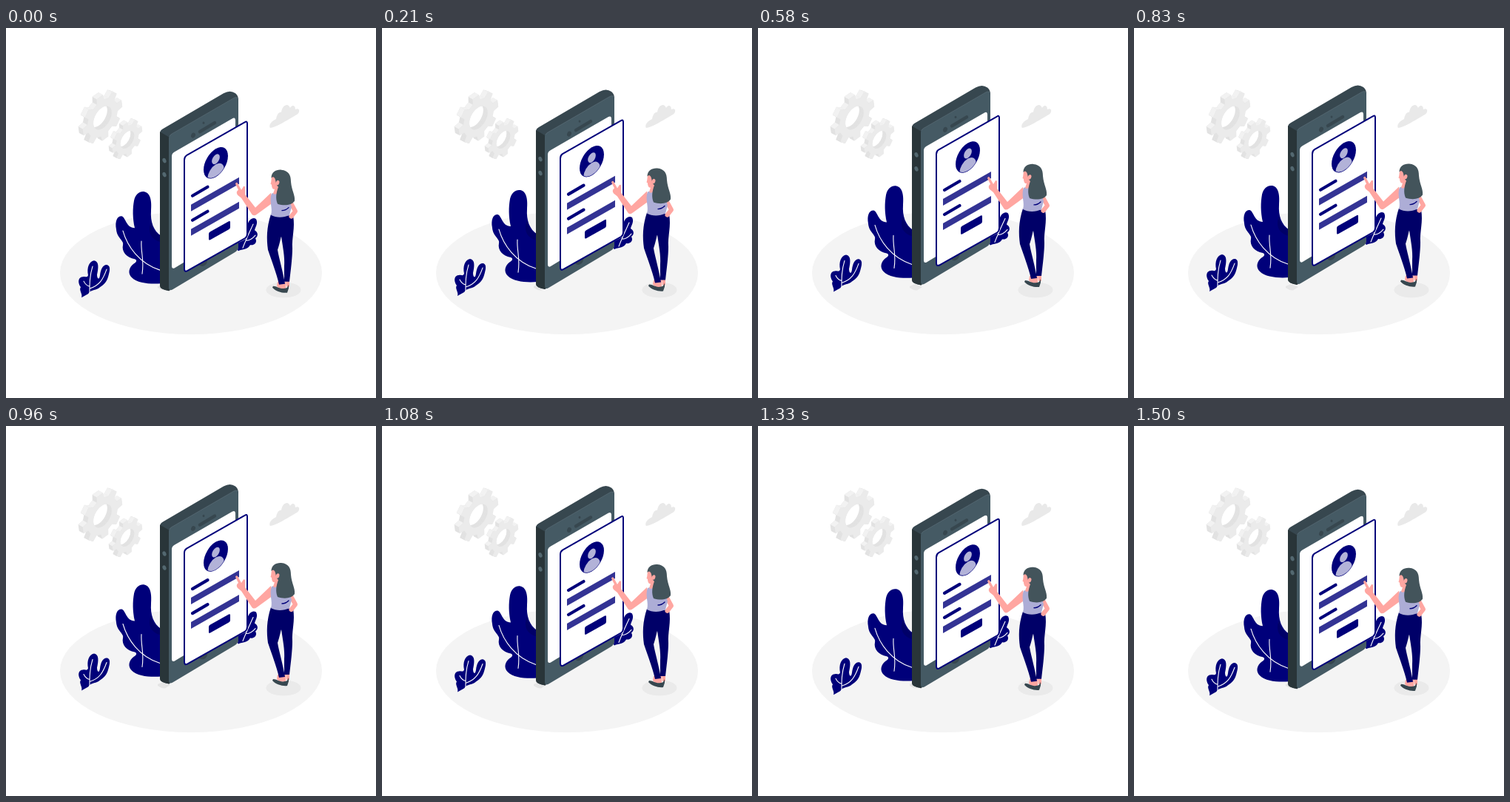
Animation of 500x500 px, one loop 1540 ms. Source, as an HTML page with a canvas:

```html
<!DOCTYPE html>
<html lang="en">
<head>
<meta charset="utf-8">
<title>Mobile sign-in</title>
<style>
html, body { margin: 0; width: 100%; height: 100%; overflow: hidden; background: #fff; }
canvas { display: block; width: 100vw; height: 100vh; }
</style>
</head>
<body>
<canvas id="stage" width="500" height="500"></canvas>
<script>
const ctx = document.getElementById('stage').getContext('2d');
const LOOP = 1540, LIFT = 8.5, PHASE = 45;
const NAVY = '#00007a', DENIM = '#000068', FIELD = '#333394', LILAC = '#b2b2d8', TOP = '#adadd6';
const SLATE = '#455a64', HAIR = '#43545b', EDGE = '#37474f', DARK = '#293539', SKIN = '#ffa6a1';

function fill(path, color) {
  ctx.fillStyle = color;
  ctx.fill(new Path2D(path));
}

function stroke(path, color, width) {
  ctx.strokeStyle = color;
  ctx.lineWidth = width;
  ctx.lineCap = ctx.lineJoin = 'round';
  ctx.stroke(new Path2D(path));
}

function oval(x, y, rx, ry, color, turn = 0) {
  ctx.fillStyle = color;
  ctx.beginPath();
  ctx.ellipse(x, y, rx, ry, turn, 0, Math.PI * 2);
  ctx.fill();
}

function shifted(dy, draw) {
  ctx.save();
  ctx.translate(0, dy);
  draw();
  ctx.restore();
}

// Draws in the plane of the phone's front face.
function onFace(x, y, draw) {
  ctx.save();
  ctx.transform(0.866, -0.5, 0, 1, x, y);
  draw();
  ctx.restore();
}

function gearPoints(radius) {
  const points = [], teeth = 8, step = Math.PI * 2 / teeth;
  const corners = [[-0.31, 0.77], [-0.2, 1], [0.2, 1], [0.31, 0.77]];
  for (let i = 0; i < teeth; i++) {
    for (const [turn, reach] of corners) {
      const angle = (i + turn) * step - 0.14;
      points.push([Math.cos(angle) * radius * reach, Math.sin(angle) * radius * reach]);
    }
  }
  return points;
}

function gear(x, y, radius, depth) {
  const points = gearPoints(radius), hole = radius * 0.46;
  const face = new Path2D();
  points.forEach(p => face.lineTo(...p));
  face.closePath();
  face.moveTo(hole, 0);
  face.arc(0, 0, hole, 0, Math.PI * 2);
  const layer = (d, color) => onFace(x - d, y - d * 0.55, () => {
    ctx.fillStyle = color;
    ctx.fill(face, 'evenodd');
  });
  for (let d = depth; d > 0; d -= 0.5) layer(d, '#e2e2e2');

  // Upward faces catch the light.
  const backX = -depth / 0.866, backY = -depth * 0.55 + backX * 0.5;
  onFace(x, y, () => points.forEach(([ax, ay], i) => {
    const [bx, by] = points[(i + 1) % points.length];
    if (bx - ax <= Math.abs(by - ay) * 0.6) return;
    ctx.fillStyle = '#f2f2f2';
    ctx.beginPath();
    ctx.moveTo(ax, ay);
    ctx.lineTo(bx, by);
    ctx.lineTo(bx + backX, by + backY);
    ctx.lineTo(ax + backX, ay + backY);
    ctx.fill();
  }));
  layer(0, '#ebebeb');
}

function scenery() {
  oval(250, 331, 177, 83, '#f4f4f4');
  oval(375, 354, 23.5, 10.5, '#eaeaea');
  fill('M205 349 L212 346 L222 350 L215 354.5 Q211 355 205 351Z', '#e5e5e5');
  gear(130.5, 121.5, 31, 6);
  gear(164, 151, 23.5, 5);
  fill('M357 135 C354 131 360 125 365 123 C366 117 369 113 372 114 C373 105 381 100 384 108 C387 103 391 105 391 110 C397 107 398 114 393 117 C384 122 366 134 357 135Z', '#e9e9e9');
}

function plants() {
  fill('M210 345 C195 346 178 345 170 337 C164 331 166 323 173 318 C177 316 177 313 174 312 C163 310 156 302 158 293 C160 287 150 284 149 272 C147 261 150 254 156 254 C162 255 162 270 174 270 C171 257 171 244 173 233 C175 224 181 220 187 221 C196 223 197 235 196 247 C195 261 199 274 210 281Z', NAVY);
  fill('M196 262 C198 272 202 277 210 281 L210 289 C198 287 190 277 196 262Z', DENIM);
  stroke('M158 274 C164 295 180 318 208 327 M183 288 C182 304 187 312 184 332', '#fff', 1.1);

  fill('M102 364 C104 359 98 354 101 350 C96 343 98 336 104 336 C108 335 109 338 111 334 C109 324 112 315 119 314 C126 315 125 324 123 333 C123 339 126 341 127 334 C128 326 131 319 137 320 C142 322 140 329 138 336 C136 343 132 347 127 350 C122 355 116 352 111 359Z', NAVY);
  stroke('M117 322 C113 335 113 345 113 358 M136 326 C131 340 126 348 113 352 M105 342 Q108 348 113 349', '#fff', 1.1);

  fill('M313 300 L314 290 L326 284 L326 267 C328 258 334 255 338 258 C341 264 337 268 336 273 C341 276 341 281 337 284 C340 289 336 294 330 293 C326 300 320 298 314 301Z', NAVY);
  stroke('M334 265 C329 276 325 284 320 297 M337 280 Q331 287 325 287', '#fff', 1.1);
}

function phone() {
  fill('M208 142 Q208 138 212 136 L294 88 Q303 83 310 88 Q314 91 314 97 L314 296 L220 355 Q208 353 208 348Z', EDGE);
  fill('M208 140 L220 147 L221 355 Q208 353 208 348Z', DARK);
  fill('M220 149 Q220 145 224 143 L307 95 Q314 91 314 98 L314 295 Q314 300 309 303 L227 352 Q220 357 220 350Z', SLATE);
  stroke('M221 146 Q222 144 224 143 L307 95 Q312 92 313.5 95', '#5b6e77', 0.7);
  fill('M224 173 Q224 169 228 167 L306 122 Q310 120 310 125 L310 274 L228 324 Q224 326 224 321Z', '#fff');
  stroke('M262 140 L282 128', EDGE, 4.4);
  oval(253, 145, 2.8, 3.6, EDGE, 0.4);
  oval(267, 128, 1.4, 1.7, EDGE);
  oval(266, 315, 6, 7, EDGE, 0.5);
  oval(214, 179, 2.4, 3.4, '#536870', -0.4);
  oval(214, 198, 2.4, 3.4, '#536870', -0.4);
}

function avatar() {
  onFace(283.5, 183, () => {
    oval(0, 0, 19, 19, NAVY);
    oval(0, -5, 6.2, 6.2, LILAC);
    ctx.beginPath();
    ctx.arc(0, 0, 18.3, 0, Math.PI * 2);
    ctx.clip();
    oval(0, 15, 13, 13, LILAC);
  });
}

function card() {
  const outline = 'M241 179 Q241 175 244 173 L323 128 Q326 126 326 130 L326 279 Q326 283 323 285 L245 329 Q241 331 241 326Z';
  fill(outline, '#fff');
  stroke(outline, NAVY, 2);
  avatar();
  for (const y of [0, 33]) {
    stroke(`M252 ${227.5 + y} L272.5 ${215.5 + y}`, NAVY, 4.2);
    fill(`M250 ${239.5 + y} L315 ${202.5 + y} V${211.5 + y} L250 ${248.5 + y}Z`, FIELD);
  }
  fill('M274 279 Q274 277 276 276 L301 262 Q303 261 303 263 V270 Q303 272 301 273 L276 287 Q274 288 274 286Z', NAVY);
}

function woman() {
  // Feet and legs
  fill('M367 343 L378 343 L378 352 Q370 354 366 349Z M378 341 H383 V350 H379Z', SKIN);
  fill('M361 349 C367 349 371 355 380 351 L382 347 L382 352 L380 358 C374 359 364 356 360 351Z', EDGE);
  fill('M358 252 C352 270 352 285 354 300 C360 318 365 330 369 347 L377 346 C374 328 369 312 367 300 C370 292 371 284 372 282 C374 296 377 310 376 322 L376 343 L383 343 C385 326 387 310 387 298 C386 284 391 270 388 254Z', DENIM);

  // Arms
  stroke('M385 237 L391 248 L385.5 255', SKIN, 6);
  fill('M358 223 L337 243 L323 225 L323 215 Q321 213 320 216 L318 219 L313 210 Q311 208 310 211 L314 219 Q310 222 313 226 L318 230 L331 250 Q334 256 339 252 L361 236Z', SKIN);

  // Torso and head
  fill('M359 224 L367 221 L371 237 L384 236 L386 242 L383 253 C375 257 365 257 358 253 C361 244 355 234 359 224Z', TOP);
  stroke('M373 247 Q378 247 382 243', NAVY, 1.4);
  fill('M360 198 C358 204 359 207 357.5 211 L359 212 C359 216 361 219 363 218 L361 224 Q364 227 368 222 L371 200Z', SKIN);
  fill('M358.5 203 C358.5 195 365 191.5 372 192 C382 193 385 199 385 208 C386 220 391 226 390 234 C386 240 376 241 367 238 C364 231 365 223 368 215 C364 212 365 206 363 203 Q361 200 358.5 203Z', HAIR);
  oval(367, 209.5, 2.3, 3.3, SKIN, 0.3);
}

function draw(now) {
  const turn = (now % LOOP + PHASE) / LOOP * Math.PI * 2;
  const rise = LIFT * (1 - Math.cos(turn)) / 2;
  ctx.fillStyle = '#fff';
  ctx.fillRect(0, 0, 500, 500);
  scenery();
  shifted(0.2 - rise, () => {
    plants();
    phone();
    shifted(-0.9, card);
    shifted(-0.5, woman);
  });
}

const start = performance.now();
function tick() {
  draw(performance.now() - start);
  requestAnimationFrame(tick);
}
tick();
</script>
</body>
</html>
```
